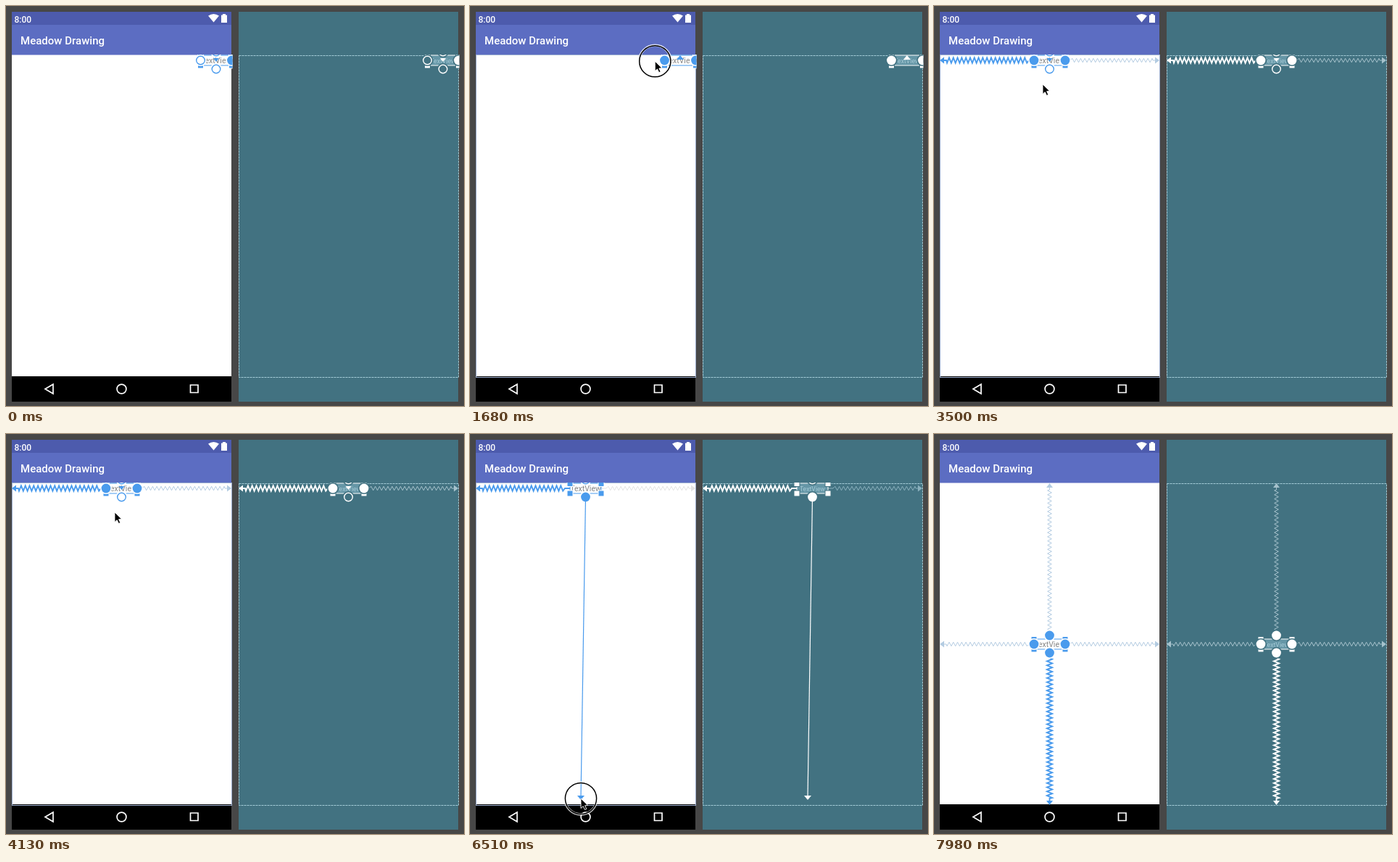
An HTML page with a canvas that plays this animation: 632x552 px, repeating every 8.05 s.

```html
<!DOCTYPE html>
<html lang="en">
<head>
<meta charset="utf-8">
<title>Constraint editor</title>
<style>
  html, body { margin: 0; width: 632px; height: 552px; overflow: hidden; background: #474747; }
  canvas { display: block; }
</style>
</head>
<body>
<canvas id="stage" width="632" height="552"></canvas>
<script>
const ctx = document.getElementById('stage').getContext('2d');
const LOOP = 8050, TAU = Math.PI * 2;
const LEFT = 8, RIGHT = 311, TOP = 68, BOTTOM = 512;
const HALF_W = 21.5, HALF_H = 7, ANCHOR_Y = 12;
const PRESS_H = 1500, DROP_H = 2430, PRESS_V = 4800, DROP_V = 6530, SETTLE = 330;

const design = { bg: '#fff', main: '#4a9bed', soft: '#b4cce2', pale: '#e3e3e3', text: '#858585', size: 10.5 };
const blueprint = { bg: '#427281', main: '#fff', soft: '#a6c2cc', pale: '#8ab0bd', text: '#a5cad6', size: 8.7, fill: '#6596a6' };

// Pointer stops: time, x, y
const pointerPath = [
  [900, 200, 570], [1400, 268, 76], [1600, 268, 76], [2200, 12.5, 81], [2650, 12.5, 81],
  [3300, 150, 108], [4300, 150, 108], [4700, 159, 90], [4850, 159, 90], [5560, 153, 503],
  [7350, 153, 503], [7700, 150, 575]
];

const ease = u => { u = Math.min(1, Math.max(0, u)); return u * u * (3 - 2 * u); };
const mix = (a, b, u) => a + (b - a) * u;
const within = (t, a, b) => t >= a && t < b;

function pointerAt(t) {
  const i = pointerPath.findIndex(p => p[0] > t);
  if (i < 1) return null;
  const [t0, x0, y0] = pointerPath[i - 1], [t1, x1, y1] = pointerPath[i];
  const u = ease((t - t0) / (t1 - t0));
  return { x: mix(x0, x1, u), y: mix(y0, y1, u) };
}

function rect(x, y, w, h, color) {
  ctx.fillStyle = color;
  ctx.fillRect(x, y, w, h);
}

function path(points, { fill, stroke, width = 1, close = true }) {
  ctx.beginPath();
  points.forEach(([x, y]) => ctx.lineTo(x, y));
  if (close) ctx.closePath();
  if (fill) { ctx.fillStyle = fill; ctx.fill(); }
  if (stroke) { ctx.strokeStyle = stroke; ctx.lineWidth = width; ctx.stroke(); }
}

function circle(x, y, r, { fill, stroke, width = 1 }) {
  ctx.beginPath();
  ctx.arc(x, y, r, 0, TAU);
  if (fill) { ctx.fillStyle = fill; ctx.fill(); }
  if (stroke) { ctx.strokeStyle = stroke; ctx.lineWidth = width; ctx.stroke(); }
}

function label(text, x, y, size, color, weight = 400, align = 'left') {
  ctx.font = `${weight} ${size}px Roboto, sans-serif`;
  ctx.textAlign = align;
  ctx.fillStyle = color;
  ctx.fillText(text, x, y);
}

// Zigzag from a parent edge to an anchor, with an arrow at the edge
function spring(x0, y0, x1, y1, color, thick) {
  const length = Math.hypot(x1 - x0, y1 - y0);
  if (length < 20) return;
  const amp = thick ? 3.6 : 2.8, points = [[5, 0], [9, 0]];
  for (let x = 10, side = 1; x < length - 8; x += 2.9, side = -side) points.push([x, amp * side]);
  points.push([length - 7, 0], [length, 0]);
  ctx.save();
  ctx.translate(x0, y0);
  ctx.rotate(Math.atan2(y1 - y0, x1 - x0));
  path([[0, 0], [6, -4.5], [6, 4.5]], { fill: color });
  path(points, { stroke: color, width: thick ? 1.9 : 1, close: false });
  ctx.restore();
}

function anchor(x, y, filled, theme) {
  circle(x, y, 8, { fill: theme.bg });
  if (filled) circle(x, y, 6.4, { fill: theme.main });
  else circle(x, y, 5.8, { fill: theme.bg, stroke: theme.main, width: 1.4 });
}

function dragLine(x0, y0, to, vertical, color) {
  if (Math.hypot(to.x - x0, to.y - y0) < 40) return;
  path([[x0, y0], [to.x, to.y - 2]], { stroke: color, width: 1.2, close: false });
  ctx.save();
  ctx.translate(to.x, to.y);
  if (!vertical) ctx.rotate(Math.PI / 2);
  path([[-5, -4], [5, -4], [0, 2]], { fill: color });
  ctx.restore();
}

function widget(t, theme, pointer) {
  const cx = mix(290, 159.5, ease((t - DROP_H) / SETTLE));
  const cy = mix(75, 290, ease((t - DROP_V) / SETTLE));
  const l = cx - HALF_W, r = cx + HALF_W, top = cy - HALF_H, bottom = cy + HALF_H;
  const dragH = within(t, PRESS_H, DROP_H), moveH = within(t, DROP_H, DROP_H + SETTLE);
  const dragV = within(t, PRESS_V, DROP_V), placed = t >= DROP_V;

  ctx.save();
  ctx.beginPath();
  ctx.rect(LEFT, TOP - 1, RIGHT - LEFT + 1.5, BOTTOM - TOP + 1.5);
  ctx.clip();

  if (t >= DROP_H) {
    const bold = !moveH && !placed;
    spring(LEFT, cy, l, cy, moveH ? theme.pale : bold ? theme.main : theme.soft, bold);
    spring(RIGHT, cy, r, cy, moveH || dragV ? theme.pale : theme.soft, false);
  }
  if (placed) {
    spring(159.5, TOP, 159.5, cy - ANCHOR_Y, theme.soft, false);
    spring(159.5, BOTTOM, 159.5, cy + ANCHOR_Y, theme.main, true);
  }

  rect(l, top, HALF_W * 2, HALF_H * 2, theme.fill || theme.bg);
  // The design view lays the text out at once; the outline follows.
  const tx = theme.fill ? cx : t < DROP_H ? 290 : 159.5;
  const ty = theme.fill ? cy : placed ? 290 : 75;
  if (tx !== cx || ty !== cy) rect(tx - 24, ty - 7, 48, 14, theme.bg);
  label('TextView', tx, ty + 3.7, theme.size, theme.text, 400, 'center');

  ctx.strokeStyle = theme.main;
  ctx.lineWidth = 1;
  ctx.strokeRect(l, top, HALF_W * 2, HALF_H * 2);
  for (const x of [l, r]) for (const y of [top + 0.5, bottom]) {
    rect(x - 4.5, y - 4.5, 9, 9, theme.bg);
    rect(x - 3.5, y - 3.5, 7, 7, theme.main);
  }

  if (!dragV) {
    anchor(l, cy, t >= PRESS_H, theme);
    anchor(r, cy, true, theme);
  }
  if (dragH || moveH) {
    path([[cx, 68], [cx + 5, 74], [cx - 5, 74]], { fill: theme.main });
  } else {
    anchor(cx, cy - ANCHOR_Y, placed, theme);
    if (!dragV && !placed) path([[cx - 4, 72], [cx + 4, 72], [cx, 77]], { fill: theme.main });
    anchor(cx, cy + ANCHOR_Y, dragV || placed, theme);
  }

  if (dragH && pointer) dragLine(l, cy, pointer, false, theme.main);
  if (dragV && pointer) dragLine(cx, cy + ANCHOR_Y, pointer, true, theme.main);
  ctx.restore();
}

function phone(active) {
  rect(8, 8, 303, 538, '#fff');
  rect(8, 8, 303, 18, '#4d5bad');
  rect(8, 26, 303, 41.5, '#5c6dc2');
  label('8:00', 11.5, 23, 12, '#fff', 500);
  label('Meadow Drawing', 20, 53, 15, '#fff', 500);

  ctx.beginPath();
  ctx.moveTo(286.5, 22.5);
  ctx.lineTo(279, 13.5);
  ctx.quadraticCurveTo(286.5, 8.5, 294, 13.5);
  ctx.fillStyle = '#fff';
  ctx.fill();
  rect(297, 12.5, 8, 10.5, '#fff');
  rect(299, 11, 4, 2, '#fff');

  rect(8, 511, 303, 35, '#000');
  const icon = { stroke: '#fff', width: 1.7 };
  path([[54, 528.5], [65, 522], [65, 535]], icon);
  circle(159.5, 528.5, 6.4, icon);
  path([[254.5, 523], [265, 523], [265, 533.5], [254.5, 533.5]], icon);

  if (active) {
    ctx.strokeStyle = '#9fb0d0';
    ctx.lineWidth = 1;
    ctx.strokeRect(8.5, 67.5, 303, 445);
  }
}

function drawPointer({ x, y }, pressed) {
  if (pressed) {
    circle(x, y, 22, { stroke: 'rgba(255,255,255,.75)', width: 3.4 });
    circle(x, y, 21.6, { stroke: '#000', width: 1.5 });
  }
  const arrow = [[0, 0], [0, 13.5], [3.2, 10.7], [5.5, 15.5], [7.8, 14.4], [5.6, 9.8], [9.7, 9.5]];
  path(arrow.map(([dx, dy]) => [x + dx, y + dy]), { fill: '#000', stroke: '#fff', width: 0.9 });
}

function draw(t) {
  const pointer = pointerAt(t);
  rect(0, 0, 632, 552, '#474747');
  phone(within(t, 900, 7400));
  widget(t, design, pointer);

  rect(321, 8, 303, 538, blueprint.bg);
  ctx.setLineDash([3, 1]);
  ctx.strokeStyle = '#a3cbd6';
  ctx.lineWidth = 1;
  ctx.strokeRect(321.5, 68.5, 303, 444);
  ctx.setLineDash([]);
  ctx.save();
  ctx.translate(313, 0);
  widget(t, blueprint, pointer);
  ctx.restore();

  const pressed = within(t, PRESS_H, DROP_H + 200) || within(t, PRESS_V, DROP_V + 200);
  if (pointer) drawPointer(pointer, pressed);
}

function tick() {
  draw(performance.now() % LOOP);
  requestAnimationFrame(tick);
}
tick();
</script>
</body>
</html>
```
